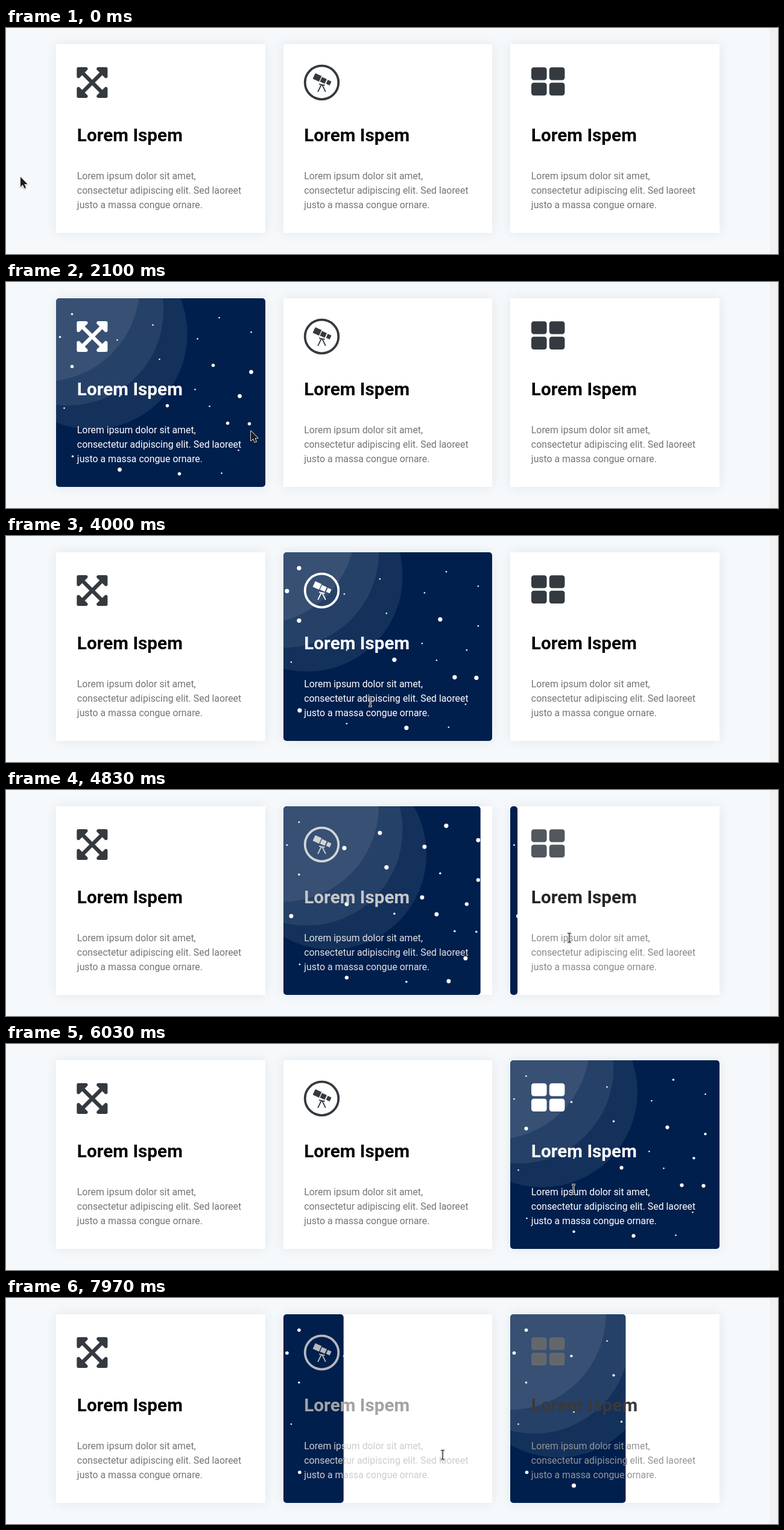
These frames come from a looping animation (1280 px wide and 375 px high, 8000 ms). An HTML page with a canvas:

```html
<!DOCTYPE html>
<html lang="en">
<head>
<meta charset="utf-8">
<title>Hover cards</title>
<style>
  html, body { margin: 0; width: 100%; height: 100%; overflow: hidden; background: #f5f9fc; }
  canvas { display: block; }
</style>
</head>
<body>
<canvas id="stage" width="1280" height="375"></canvas>
<script>
const ctx = document.getElementById('stage').getContext('2d');
const LOOP = 8000, FADE = 500, ZOOM = .99;
const CARD = { y: 27, w: 346.8, h: 313, pad: 35 * ZOOM };
const NAVY = '#001f4d', INK = [52, 58, 64], BLACK = [0, 0, 0], GREY = [117, 117, 117];
const COPY = ['Lorem ipsum dolor sit amet,', 'consectetur adipiscing elit. Sed laoreet', 'justo a massa congue ornare.'];

// hover and title hold [enter, leave] spans in ms
const cards = [
  { x: 83.2, icon: drawArrows, hover: [[803, 2782]], title: [] },
  { x: 459.6, icon: drawTelescope, hover: [[2783, 4747], [7784, Infinity]], title: [] },
  { x: 836.2, icon: drawGrid, hover: [[4764, 7735]], title: [[6160, 7690]] }
];

// stars that pulse together: period and time of one peak
const clusters = [
  { period: 1415, peak: 1170, at: [[26, 26], [6, 64], [27, 262]] },
  { period: 1830, peak: 3000, at: [[270, 32], [101, 69], [171, 101]] },
  { period: 1985, peak: 3000, at: [[160, 44], [323, 56], [234, 67], [230, 151], [105, 162], [13, 182], [254, 179], [302, 252], [274, 290]] },
  { period: 2400, peak: 4000, at: [[26, 113], [260, 111], [184, 178], [284, 207], [320, 208], [204, 291]] },
  { period: 2850, peak: 5230, at: [[323, 122], [304, 162], [105, 284]] }
];

const moves = [
  { from: 700, to: 1130, x: 406, y: 247 },
  { from: 2700, to: 2880, x: 604, y: 275 },
  { from: 4600, to: 4850, x: 940, y: 244 },
  { from: 6000, to: 6250, x: 953, y: 179 },
  { from: 7590, to: 7910, x: 724, y: 260 }
];

const lerp = (a, b, p) => a + (b - a) * p;
const clamp = v => Math.min(1, Math.max(0, v));
const smooth = p => p * p * (3 - 2 * p);

function bezier(x1, y1, x2, y2) {
  const at = (a, b, u) => 3 * a * u * (1 - u) ** 2 + 3 * b * u * u * (1 - u) + u ** 3;
  return x => {
    if (x <= 0) return 0;
    if (x >= 1) return 1;
    let lo = 0, hi = 1;
    for (let i = 0; i < 24; i++) {
      const mid = (lo + hi) / 2;
      if (at(x1, x2, mid) < x) lo = mid; else hi = mid;
    }
    return at(y1, y2, lo);
  };
}
const ease = bezier(.25, .1, .25, 1);
const easeInOut = bezier(.42, 0, .58, 1);

function hoverAmount(spans, t, curve) {
  let v = 0;
  for (const [enter, leave] of spans) {
    if (t >= leave) v = 1 - curve((t - leave) / FADE);
    else if (t >= enter) v = curve((t - enter) / FADE);
  }
  return v;
}

function toWhite(rgb, p) {
  return `rgb(${rgb.map(c => Math.round(lerp(c, 255, p))).join(',')})`;
}

function disc(x, y, r) {
  ctx.beginPath();
  ctx.arc(x, y, r, 0, Math.PI * 2);
  ctx.fill();
}

const arrows = new Path2D();
const arm = new Path2D('M0 0L-39.6 0-146.8-107.3-183-71c-15.1 15.1-41 4.4-41-17V-200a24 24 0 0 1 24-24h112c21.4 0 32.1 25.9 17 41l-36.2 36.2L0-39.6Z');
for (let i = 0; i < 4; i++) arrows.addPath(arm, new DOMMatrix().rotate(i * 90));

function drawArrows() {
  ctx.translate(59.7, 63.5);
  ctx.scale(.114, .114);
  ctx.fill(arrows);
}

function drawTelescope() {
  ctx.translate(63.9, 63.5);
  ctx.lineWidth = 3.8;
  ctx.beginPath();
  ctx.arc(0, 0, 27.8, 0, Math.PI * 2);
  ctx.stroke();
  ctx.lineWidth = 1.8;
  ctx.stroke(new Path2D('M-4.5 2.6L5 4.6M-.6 3.5L-6.4 15.3M.6 3.5L6.4 15.3'));
  ctx.rotate(.43);
  ctx.fillRect(-16.2, -9.7, 11.5, 10.2);
  ctx.fillRect(-3.4, -8.6, 8.8, 8.4);
  ctx.fillRect(7.3, -8.2, 6.6, 7);
}

function drawGrid() {
  ctx.beginPath();
  for (const x of [34.8, 64.6])
    for (const y of [38.3, 63.8]) ctx.roundRect(x, y, 25.6, 21.2, 4.2);
  ctx.fill();
}

// three equal discs slide in along the diagonal once the panel is open
function drawDiscs(elapsed) {
  ctx.fillStyle = 'rgba(255,255,255,.08)';
  for (let i = 0; i < 3; i++) {
    const c = ZOOM * (i * 40 - 240 * (1 - easeInOut((elapsed - FADE) / 1000)));
    disc(c, c, 160 * ZOOM);
  }
}

function drawStars(t) {
  ctx.fillStyle = '#fff';
  for (const { period, peak, at } of clusters) {
    const r = 2.4 + 1.2 * Math.cos((t - peak) / period * Math.PI * 2);
    for (const [x, y] of at) disc(x + .3, y + .3, r);
  }
}

function drawSky(card, left, width, t) {
  const w = width * hoverAmount(card.hover, t, easeInOut);
  if (w < .3) return;
  const entered = card.hover.filter(span => span[0] <= t).pop()[0];
  ctx.save();
  ctx.beginPath();
  ctx.roundRect(left, CARD.y, w, CARD.h, Math.min(5, w / 2));
  ctx.fillStyle = NAVY;
  ctx.fill();
  ctx.clip();
  ctx.translate(card.x, CARD.y);
  drawDiscs(t - entered);
  drawStars(t);
  ctx.restore();
}

function drawCard(card, t) {
  const left = Math.round(card.x), width = Math.round(card.x + CARD.w) - left;
  ctx.save();
  ctx.shadowColor = 'rgba(0,0,0,.08)';
  ctx.shadowBlur = 20;
  ctx.fillStyle = '#fff';
  ctx.fillRect(left, CARD.y, width, CARD.h);
  ctx.restore();
  drawSky(card, left, width, t);

  const tint = hoverAmount(card.hover, t, ease);
  ctx.save();
  ctx.translate(card.x, CARD.y);
  ctx.save();
  ctx.fillStyle = ctx.strokeStyle = toWhite(INK, tint);
  card.icon();
  ctx.restore();

  ctx.font = `700 ${30 * ZOOM}px Roboto, sans-serif`;
  ctx.letterSpacing = hoverAmount(card.title, t, ease).toFixed(3) + 'px';
  ctx.fillStyle = toWhite(BLACK, tint);
  ctx.fillText('Lorem Ispem', CARD.pad, 161);
  ctx.letterSpacing = '0px';
  ctx.font = `400 ${16 * ZOOM}px Roboto, sans-serif`;
  ctx.fillStyle = toWhite(GREY, tint);
  COPY.forEach((line, i) => ctx.fillText(line, CARD.pad, 224 + i * 24));
  ctx.restore();
}

const shapes = {
  arrow: new Path2D('M0 0V16.5L3.8 13 6.4 19 9 17.9 6.5 12H11.6Z'),
  beam: new Path2D('M-3-7.5H-1L0-6.8 1-7.5H3M0-6.8V6.8M-3 7.5H-1L0 6.8 1 7.5H3'),
  hand: new Path2D('M-1.6 1Q0-1 1.6 1V6Q3.2 5 4.2 6.6 6 5.8 6.8 7.4 9 6.8 9.2 9V12L7.6 16.5H-.6L-5.2 10.8Q-5.4 8.4-3.4 9.2L-1.6 11Z')
};

function pointerKind(x, y) {
  const inside = cards.some(c => x > c.x + CARD.pad && x < c.x + CARD.w - CARD.pad);
  if (inside && y > 160 && y < 200) return 'hand';
  if (inside && y > 234 && y < 306) return 'beam';
  return 'arrow';
}

function drawPointer(t) {
  let x = t < 200 ? 24 : 23, y = 247;
  for (const move of moves) {
    const p = smooth(clamp((t - move.from) / (move.to - move.from)));
    x = lerp(x, move.x, p);
    y = lerp(y, move.y, p);
  }
  const kind = pointerKind(x, y), shape = shapes[kind];
  ctx.save();
  ctx.translate(Math.round(x), Math.round(y));
  ctx.lineJoin = 'round';
  ctx.strokeStyle = '#fff';
  ctx.shadowColor = 'rgba(0,0,0,.35)';
  ctx.shadowBlur = 2;
  ctx.shadowOffsetY = 1;
  if (kind === 'beam') {
    ctx.lineWidth = 3;
    ctx.stroke(shape);
    ctx.shadowColor = 'transparent';
    ctx.strokeStyle = '#111';
    ctx.lineWidth = 1.2;
    ctx.stroke(shape);
  } else if (kind === 'arrow') {
    ctx.lineWidth = 1.6;
    ctx.stroke(shape);
    ctx.shadowColor = 'transparent';
    ctx.fillStyle = '#1b1b1f';
    ctx.fill(shape);
  } else {
    ctx.fillStyle = '#fff';
    ctx.fill(shape);
    ctx.shadowColor = 'transparent';
    ctx.strokeStyle = '#111';
    ctx.lineWidth = 1.1;
    ctx.stroke(shape);
    ctx.stroke(new Path2D('M1.6 6V9M4.2 6.6V9.4M6.8 7.4V9.8'));
  }
  ctx.restore();
}

function draw(now) {
  const t = now % LOOP;
  ctx.fillStyle = '#f5f9fc';
  ctx.fillRect(0, 0, 1280, 375);
  ctx.fillStyle = '#f1f0f2';
  ctx.fillRect(1266, 0, 14, 375);
  for (const card of cards) drawCard(card, t);
  drawPointer(t);
}

let start;
function tick(now) {
  start ??= now;
  draw(now - start);
  requestAnimationFrame(tick);
}
requestAnimationFrame(tick);
</script>
</body>
</html>
```
